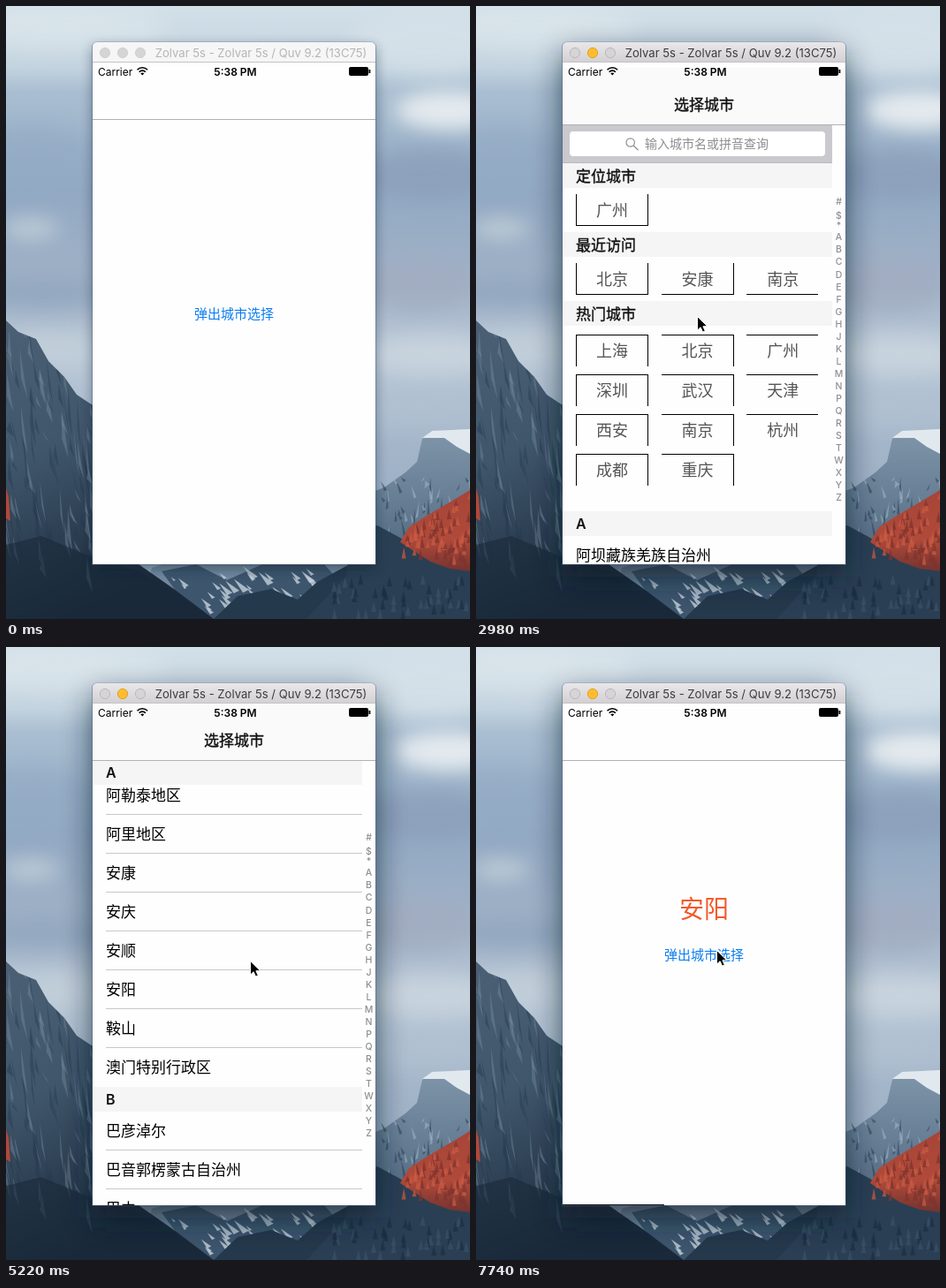
Recreate the animation shown at these times as an HTML page. Size 525 px wide and 694 px high, loop 8 s.

```html
<!DOCTYPE html>
<html lang="zh-CN">
<head>
<meta charset="utf-8">
<title>选择城市</title>
<style>
html, body { margin: 0; width: 100%; height: 100%; overflow: hidden; }
svg { display: block; width: 100vw; height: 100vh; }
text { font-family: "Noto Sans CJK SC", "Noto Sans CJK", sans-serif; }
.ui { font-family: Inter, Roboto, sans-serif; }
.bold { stroke: #111; stroke-width: .35; }
rect { shape-rendering: crispEdges; }
.soft { shape-rendering: auto; }
</style>
</head>
<body>
<svg id="stage" viewBox="0 0 525 694" preserveAspectRatio="none">
  <defs>
    <linearGradient id="sky" x2="0" y2="1">
      <stop offset="0" stop-color="#d2e0e8"/><stop offset=".1" stop-color="#c3d3df"/>
      <stop offset=".14" stop-color="#a9bed1"/><stop offset=".3" stop-color="#92a9c3"/>
      <stop offset=".46" stop-color="#a1b2c7"/><stop offset=".57" stop-color="#bccad8"/>
      <stop offset=".72" stop-color="#a3b5c9"/><stop offset="1" stop-color="#8fa5bb"/>
    </linearGradient>
    <linearGradient id="rock" x2=".3" y2="1">
      <stop offset="0" stop-color="#4b6074"/><stop offset=".45" stop-color="#40566b"/>
      <stop offset="1" stop-color="#1b2a3b"/>
    </linearGradient>
    <linearGradient id="dome" x2="0" y2="1">
      <stop offset="0" stop-color="#7f95aa"/><stop offset="1" stop-color="#3c556d"/>
    </linearGradient>
    <linearGradient id="trees" x2="0" y2="1">
      <stop offset="0" stop-color="#a54538"/><stop offset=".6" stop-color="#b04a3a"/>
      <stop offset="1" stop-color="#74332f"/>
    </linearGradient>
    <linearGradient id="bar" x2="0" y2="1">
      <stop offset="0" stop-color="#e9e7e9"/><stop offset="1" stop-color="#d2d0d2"/>
    </linearGradient>
    <filter id="haze" x="-50%" y="-80%" width="200%" height="260%"><feGaussianBlur stdDeviation="11"/></filter>
    <filter id="near" x="-20%" y="-20%" width="140%" height="140%"><feGaussianBlur stdDeviation="7"/></filter>
    <filter id="far" x="-30%" y="-20%" width="160%" height="140%"><feGaussianBlur stdDeviation="17"/></filter>
    <clipPath id="screen"><rect x="98" y="64" width="320" height="568"/></clipPath>
    <clipPath id="table"><rect x="98" y="128" width="320" height="504"/></clipPath>
    <clipPath id="cliff"><path id="cliffShape" d="M0 356L14 369 34 377 48 402 66 420 80 440 110 460V560L150 632 190 660 235 694H0z"/></clipPath>
  </defs>
  <g id="photo"></g>
  <g id="frame"></g>
  <g clip-path="url(#screen)">
    <g id="home"></g>
    <g id="modal">
      <rect x="98" y="64" width="320" height="568" fill="#fefefe"/>
      <g clip-path="url(#table)"><g id="list"></g><g id="heads"></g></g>
      <g id="chrome"></g>
    </g>
    <g id="status"></g>
  </g>
  <path id="pointer" d="M0 0V15.6L3.6 12.2 6 17.6 8.8 16.4 6.4 11.2H11.4z" fill="#000" stroke="#fff" stroke-width="1"/>
</svg>
<script>
const $ = id => document.getElementById(id);

function add(parent, tag, attrs, text) {
  const el = document.createElementNS('http://www.w3.org/2000/svg', tag);
  for (const k in attrs) el.setAttribute(k, attrs[k]);
  if (text) el.textContent = text;
  return parent.appendChild(el);
}
const box = (p, x, y, width, height, fill, more) => add(p, 'rect', { x, y, width, height, fill, ...more });
const shape = (p, d, fill, more) => add(p, 'path', { d, fill, ...more });
// y is the vertical middle of the glyphs
const label = (p, s, x, y, size, fill, more) =>
  add(p, 'text', { x, y: y + size * .37, 'font-size': size, fill, ...more }, s);
const mid = { 'text-anchor': 'middle' };

let seed = 7;
const rnd = () => (seed = seed * 16807 % 2147483647) / 2147483647;

function drawPhoto(g) {
  box(g, 0, 0, 525, 694, 'url(#sky)');
  const cloud = (cx, cy, rx, ry, fill, opacity) =>
    add(g, 'ellipse', { cx, cy, rx, ry, fill, opacity, filter: 'url(#haze)' });
  cloud(60, 25, 120, 26, '#dfe8ed', .6);
  cloud(480, 40, 90, 34, '#d6e2ea', .8);
  cloud(500, 118, 60, 22, '#edf1f3', .9);
  cloud(480, 190, 80, 28, '#8c9fba', .8);
  cloud(30, 175, 70, 40, '#93aac5', .7);
  cloud(28, 252, 32, 11, '#c5d1da', .9);
  cloud(470, 315, 60, 30, '#a2acc0', .7);
  cloud(40, 325, 80, 20, '#8ea4bd', .7);
  cloud(50, 385, 60, 14, '#c4d1dc', .8);
  cloud(480, 395, 70, 22, '#c9d4de', .9);
  cloud(470, 455, 80, 20, '#b1c1d1', .7);

  // far valley
  shape(g, 'M150 694L165 636 200 625H420V694z', '#71899f');
  shape(g, 'M176 640L215 632 250 650 290 632H360L385 660 360 694H215z', '#3d566d');
  for (let i = 0; i < 42; i++) {
    const x = 185 + rnd() * 170, y = 634 + rnd() * 50, w = 4 + rnd() * 14;
    shape(g, `M${x} ${y}l${w} ${w * .7}l${-w * .4} ${w * .2}z`, '#cddae4', { opacity: .75 });
  }
  shape(g, 'M235 694L262 668 300 660 330 672 352 652 385 634 420 632V694z', '#25394c');

  // dome and forest on the right
  shape(g, 'M400 556L428 545 452 528 465 516 471 490 482 481 525 490V694H400z', 'url(#dome)');
  shape(g, 'M471 489L482 481 525 479V507L510 499 496 489z', '#e2e9ee');
  for (let i = 0; i < 60; i++) {
    const x = 424 + rnd() * 100, y = 530 + rnd() * 62, h = 5 + rnd() * 16;
    shape(g, `M${x} ${y}l${4 - rnd() * 9} ${h}l3 -2z`, rnd() < .5 ? '#a0b4c5' : '#2d455c', { opacity: .6 });
  }
  shape(g, 'M390 600L420 588 446 602 480 628 525 634V694H340L385 645z', '#2a3f54');
  shape(g, 'M446 607L456 590 476 577 500 563 525 548V640L502 637 480 629z', 'url(#trees)');
  for (let i = 0; i < 75; i++) {
    const u = rnd(), x = 450 + u * 75, y = 594 - u * 46 + rnd() * (22 + u * 55), h = 7 + rnd() * 7;
    shape(g, `M${x} ${y}l2.5 ${h}h-5z`, rnd() < .5 ? '#c85a43' : '#7f332e', { opacity: .75 });
  }
  for (let i = 0; i < 50; i++) {
    const x = 370 + rnd() * 155, y = 642 + rnd() * 42;
    shape(g, `M${x} ${y}l3 12h-6z`, rnd() < .5 ? '#1b2c3d' : '#3d5469', { opacity: .6 });
  }

  // cliff on the left
  shape(g, $('cliffShape').getAttribute('d'), 'url(#rock)');
  const face = add(g, 'g', { 'clip-path': 'url(#cliff)' });
  for (let i = 0; i < 150; i++) {
    const x = rnd() * 125 - 10, y = 355 + rnd() * 270, h = 14 + rnd() * 46;
    shape(face, `M${x} ${y}l${4 + rnd() * 5} ${h}l${-4 - rnd() * 4} ${-h * .4}z`,
      rnd() < .5 ? '#74899b' : '#253a4e', { opacity: .45 });
  }
  shape(face, 'M0 610L40 600 100 625 150 640 235 694H0z', '#18283a', { opacity: .6 });
  shape(g, 'M0 546L3 556 5 583 0 580z', '#b0483a');
}

const lamps = [];
let shadows, titleBar, titleText;
function drawFrame(g) {
  const shadow = (y, filter, opacity) =>
    box(g, 98, 41 + y, 320, 591, '#0d1a2b', { filter: `url(#${filter})`, opacity });
  shadows = [shadow(5, 'near', .45), shadow(14, 'far', .7)];
  shape(g, 'M97.5 632.5V46a5 5 0 0 1 5-5H413.500a5 5 0 0 1 5 5V632.500z', 'none', { stroke: '#53647a', 'stroke-opacity': .45 });
  titleBar = shape(g, 'M98 64V46a5 5 0 0 1 5-5H413a5 5 0 0 1 5 5V64z', '#f6f6f6');
  box(g, 98, 63, 320, 1, '#c4c3c5');
  for (const cx of [112, 132, 152]) lamps.push(add(g, 'circle', { cx, cy: 53, r: 5.6 }));
  titleText = label(g, 'Zolvar 5s - Zolvar 5s / Quv 9.2 (13C75)', 288.500, 53.300, 13.100, '#b5b5b5', { ...mid, class: 'ui' });
  box(g, 98, 64, 320, 568, '#fefefe');
}

let city, button, residue;
function drawHome(g) {
  box(g, 98, 128, 320, 1, '#b2b2b2');
  city = label(g, '安阳', 258, 297, 28, '#f4592b', mid);
  button = label(g, '弹出城市选择', 258, 348.300, 15, '#0b7df0', mid);
  residue = box(g, 98, 631, 115, 1, '#111');
}

function drawStatus(g) {
  label(g, 'Carrier', 104, 74.300, 12, '#000', { class: 'ui' });
  label(g, '5:38 PM', 259.500, 74.300, 12, '#000', { ...mid, class: 'ui', 'font-weight': 600 });
  const arc = { stroke: '#000', 'stroke-width': 1.6 };
  shape(g, 'M148.500 72.300a8 8 0 0 1 11.600 0M150.700 74.700a5 5 0 0 1 7.200 0', 'none', arc);
  shape(g, 'M152.300 76.300a3 3 0 0 1 4 0L154.300 78.600z', '#000');
  box(g, 388, 69, 22, 10, '#000', { rx: 2, class: 'soft' });
  box(g, 410.500, 72, 1.800, 4, '#000', { class: 'soft' });
}

const sections = [['定位城市', 172], ['最近访问', 250], ['热门城市', 328], ['A', 566], ['B', 1122], ['', 9999]];
const groups = [
  [225, ['广州']],
  [303, ['北京', '安康', '南京']],
  [384, ['上海', '北京', '广州', '深圳', '武汉', '天津', '西安', '南京', '杭州', '成都', '重庆']]
];
const rowsA = '阿坝藏族羌族自治州 阿克苏地区 阿拉尔 阿拉善盟 阿勒泰地区 阿里地区 安康 安庆 安顺 安阳 鞍山 澳门特别行政区'.split(' ');
const rowsB = '巴彦淖尔 巴音郭楞蒙古自治州 巴中 白城'.split(' ');
const even = [], odd = [];   // hairlines that survive on whole or half pixels
let picked;

function drawList(g) {
  box(g, 98, 128, 305, 44, '#c9c9ce');
  box(g, 98, 171, 305, 1, '#b9b9be');
  box(g, 106, 136, 289, 28, '#fff', { rx: 4, class: 'soft' });
  shape(g, 'M179.400 148.500a4.700 4.700 0 1 1-9.400 0a4.700 4.700 0 1 1 9.400 0M178.200 152L183.500 157.200', 'none', { stroke: '#8e8e93', 'stroke-width': 1.2 });
  label(g, '输入城市名或拼音查询', 191, 150, 14, '#8e8e93');

  groups.forEach(([y0, names], n) => names.forEach((name, i) => {
    const col = i % 3, y = y0 + 45 * Math.floor(i / 3), x = 113 + Math.round(96.6 * col);
    const w = col < 2 ? 82 : 81, top = y - 18;
    label(g, name, 154 + 96.600 * col, y, 18, '#555', mid);
    const line = (ly, list) => list.push(box(g, x, ly, w, 1, '#000'));
    line(top, n < 2 ? odd : even);
    line(top + 35, n < 2 ? even : odd);
    if (!col) box(g, x, top, 1, 36, '#000');
    if (col < 2) box(g, x + w - 1, top, 1, 36, '#000');
  }));

  picked = box(g, 98, 990, 305, 44, '#d9d9d9');
  const rows = (names, y0) => names.forEach((name, i) => {
    const y = y0 + 44 * i;
    if (i < names.length - 1) box(g, 113, y + 43.500, 290, 1, '#c8c7cc');
    label(g, name, 113, y + 22, 17, '#000');
  });
  rows(rowsA, 594);
  rows(rowsB, 1150);
}

const heads = [];
function drawHeads(g) {
  for (const [name] of sections.slice(0, -1)) {
    const h = add(g, 'g', {});
    box(h, 98, 0, 305, 28, '#f5f5f5');
    const latin = name.length === 1;
    label(h, name, 113, 14.500, latin ? 16 : 17, '#111', latin ? { class: 'ui', 'font-weight': 600 } : { class: 'bold' });
    heads.push(h);
  }
}

function drawChrome(g) {
  box(g, 98, 64, 320, 64, '#fafafa');
  box(g, 98, 128, 320, 1, '#b2b2b2');
  label(g, '选择城市', 258, 106, 17, '#111', { ...mid, class: 'bold' });
  const mark = (s, y) => label(g, s, 410.500, y, 10.500, '#8e8e93', { ...mid, class: 'ui', 'font-weight': 500 });
  mark('#', 215);
  mark('$', 231.500);
  mark('*', 242);
  [...'ABCDEFGHJKLMNPQRSTWXYZ'].forEach((s, i) => mark(s, 255.500 + 14.050 * i));
}

drawPhoto($('photo'));
drawFrame($('frame'));
drawHome($('home'));
drawStatus($('status'));
drawList($('list'));
drawHeads($('heads'));
drawChrome($('chrome'));

const ticks = [0];
for (const [a, b, n] of [[900, 1940, 8], [2680, 3130, 4], [3430, 4470, 8], [4620, 4920, 3],
  [5220, 6260, 8], [6410, 7440, 8], [7590, 7740, 2]])
  for (let i = 0; i < n; i++) ticks.push(Math.floor((a + (b - a) * i / (n - 1)) / 10) * 10);

const path = [[900, 330, 590], [1040, 285, 450], [1190, 258, 375], [1340, 250, 351], [3330, 250, 351],
  [3570, 282, 430], [3720, 285, 451], [4020, 281, 269], [4170, 280, 205], [4920, 279, 215],
  [5220, 276, 355], [5660, 239, 383], [6410, 239, 383], [7290, 272, 343], [8000, 272, 343]];

function pointerAt(t) {
  const i = Math.max(1, path.findIndex(p => p[0] >= t));
  const [a, b] = [path[i - 1], path[i]], k = (t - a[0]) / (b[0] - a[0]);
  return [a[1] + (b[1] - a[1]) * k, a[2] + (b[2] - a[2]) * k];
}

function scrollAt(t) {
  if (t <= 3720) return 0;
  if (t <= 4020) return 181.500 * (t - 3720) / 300;
  return t >= 4920 ? 624.500 : 624.500 - 443 * Math.exp((4020 - t) / 220);
}

// critically damped slide: the part of the way still to go
const spring = ms => { const u = Math.max(0, ms) * .0183; return (1 + u) * Math.exp(-u); };
function modalAt(t) {
  if (t < 2620 || t >= 6560) return 568;
  return Math.round(568 * (t < 6000 ? spring(t - 2620) : 1 - spring(t - 6106.700)));
}

const show = (el, on) => el.setAttribute('visibility', on ? 'inherit' : 'hidden');

function render(time) {
  const t = ticks.filter(k => k <= time).pop();
  const active = t >= 1190, scroll = Math.round(scrollAt(t) * 2) / 2;

  show(shadows[0], !active);
  show(shadows[1], active);
  titleBar.setAttribute('fill', active ? 'url(#bar)' : '#f6f6f6');
  titleText.setAttribute('fill', active ? '#3b3b3d' : '#b5b5b5');
  lamps.forEach((lamp, i) => {
    const lit = active && i === 1;
    lamp.setAttribute('fill', lit ? '#ffbd2e' : active ? '#d6d4d6' : '#d5d5d5');
    lamp.setAttribute('stroke', lit ? '#dfa023' : active ? '#b9b7b9' : '#d0d0d0');
  });

  show(city, t >= 6110);
  show(residue, t >= 6560);
  button.setAttribute('opacity', t === 7590 ? .3 : 1);

  const drop = modalAt(t);
  show($('modal'), drop < 568);
  $('modal').setAttribute('transform', `translate(0 ${drop})`);
  $('list').setAttribute('transform', `translate(0 ${-scroll})`);
  const whole = scroll % 1 === 0;
  even.forEach(l => show(l, whole));
  odd.forEach(l => show(l, !whole));
  show(picked, t >= 5950);
  heads.forEach((h, i) => {
    const y = Math.min(Math.max(sections[i][1] - scroll, 128), sections[i + 1][1] - scroll - 28);
    h.setAttribute('transform', `translate(0 ${y})`);
  });

  show($('pointer'), t >= 900);
  const [x, y] = pointerAt(t);
  $('pointer').setAttribute('transform', `translate(${x + .5} ${y + .5})`);
}

const start = performance.now();
function loop() {
  render((performance.now() - start) % 8000);
  requestAnimationFrame(loop);
}
loop();
</script>
</body>
</html>
```
